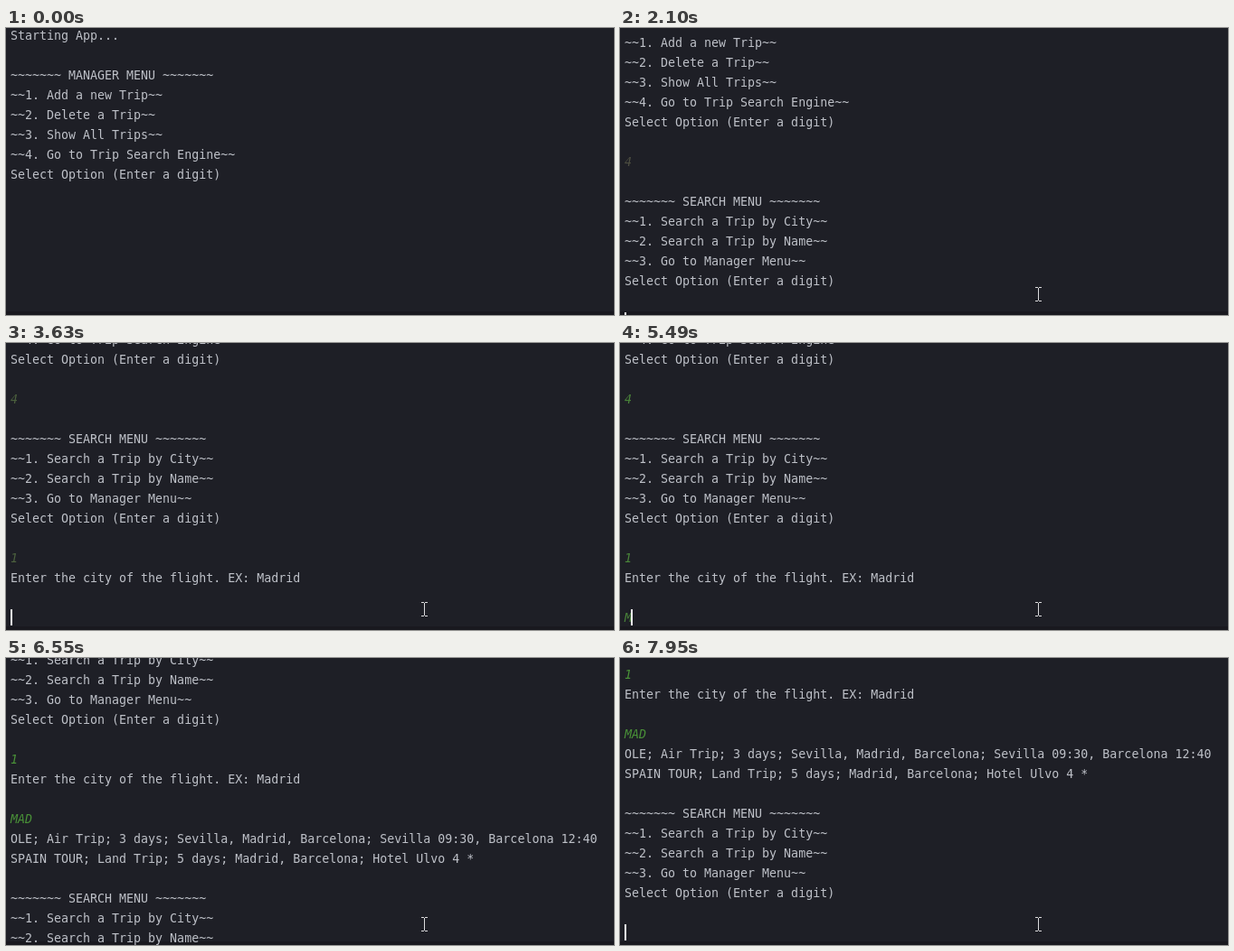
An HTML page with a canvas that plays this animation: 672x318 px, repeating every 8 s.

```html
<!DOCTYPE html>
<html lang="en">
<head>
<meta charset="utf-8">
<title>Trip manager console</title>
<style>
  html, body { margin: 0; width: 100%; height: 100%; overflow: hidden; background: #1e1f26; }
  canvas { display: block; }
</style>
</head>
<body>
<canvas id="stage" width="672" height="318"></canvas>
<script>
const ctx = document.getElementById('stage').getContext('2d', { alpha: false });
const LOOP = 8000, LINE = 22, CHAR = 8, LEFT = 5;
const LAST_ROW_TOP = 296;
const IDLE = 800, BLINK = 525, SETTLE = 70;
const FONT = '13.3px "DejaVu Sans Mono", monospace';

const menu = (name, ...items) => [
  '',
  `~~~~~~~ ${name} MENU ~~~~~~~`,
  ...items.map((item, i) => `~~${i + 1}. ${item}~~`),
  'Select Option (Enter a digit)',
  ''
];
const managerMenu = menu('MANAGER', 'Add a new Trip', 'Delete a Trip', 'Show All Trips', 'Go to Trip Search Engine');
const searchMenu = menu('SEARCH', 'Search a Trip by City', 'Search a Trip by Name', 'Go to Manager Menu');

// Console actions. A print may lag: it stays short of its full scroll for a moment.
const type = s => c => { c.input += s; };
const erase = c => { c.input = c.input.slice(0, -1); };
const enter = c => { c.lines.push({ text: c.input, typed: true }); c.input = ''; };
const print = (texts, lag = 0) => c => {
  c.lines.push(...texts.map(text => ({ text })));
  c.lag = lag;
};

const script = [
  [-1040, print(['Starting App...', ...managerMenu])],
  [1570, type('4')],
  [1900, enter],
  [2100, print(searchMenu, 20)],
  [2900, type('1')],
  [3430, enter],
  [3630, print(['Enter the city of the flight. EX: Madrid', ''])],
  [4830, type('M')],
  [4890, type('A')],
  [5490, erase],
  [5620, type('A')],
  [5750, type('D')],
  [6020, enter],
  [6550, print([
    'OLE; Air Trip; 3 days; Sevilla, Madrid, Barcelona; Sevilla 09:30, Barcelona 12:40',
    'SPAIN TOUR; Land Trip; 5 days; Madrid, Barcelona; Hotel Ulvo 4 *',
    ...searchMenu
  ], 94)]
];

function consoleAt(t) {
  const c = { lines: [], input: '', lag: 0 };
  let last = 0;
  for (const [time, act] of script) {
    if (time > t) break;
    c.lag = 0;
    act(c);
    last = time + (c.lag ? SETTLE : 0);
  }
  const idle = t - last;
  c.row = c.lines.length;
  c.scroll = Math.max(0, c.row * LINE - LAST_ROW_TOP) - (idle < 0 ? c.lag : 0);
  c.caret = idle < IDLE || Math.floor((idle - IDLE) / BLINK) % 2 === 1;
  return c;
}

// Typed text turns from a dull brown to green over the session.
function inputColor(t) {
  const k = Math.min(1, t / 6000) ** 2;
  const mix = (a, b) => Math.round(a + (b - a) * k);
  return `rgb(${mix(77, 74)}, ${mix(69, 146)}, ${mix(66, 56)})`;
}

const mousePath = [[200, 300, 212], [700, 416, 293], [959, 370, 268], [1097, 462, 295]];

function mouseAt(t) {
  const s = 200 + Math.floor((t - 200) / 69) * 69;
  const i = mousePath.findIndex(([time]) => time > s);
  if (i < 0) return mousePath[mousePath.length - 1].slice(1);
  const [t0, x0, y0] = mousePath[i - 1], [t1, x1, y1] = mousePath[i];
  const k = (s - t0) / (t1 - t0);
  return [Math.round(x0 + (x1 - x0) * k), Math.round(y0 + (y1 - y0) * k)];
}

function rect(color, x, y, w, h) {
  ctx.fillStyle = color;
  ctx.fillRect(x, y, w, h);
}

function drawMouse([x, y]) {
  const color = '#dcdcde';
  rect(color, x, y - 7, 1, 14);
  for (const edge of [y - 8, y + 7]) {
    rect(color, x - 3, edge, 3, 1);
    rect(color, x + 1, edge, 3, 1);
  }
}

function draw(t) {
  const c = consoleAt(t);

  rect('#1e1f26', 0, 0, 672, 318);
  rect('#19191f', 0, 314, 672, 4);

  [...c.lines, { text: c.input, typed: true }].forEach(({ text, typed }, row) => {
    ctx.font = typed ? 'italic ' + FONT : FONT;
    ctx.fillStyle = typed ? inputColor(t) : '#bec1c8';
    ctx.fillText(text, LEFT, 13 + row * LINE - c.scroll);
  });

  if (c.caret) {
    const col = c.input.length;
    rect('#f4f4f6', LEFT + col * CHAR - (col ? 1 : 0), c.row * LINE - c.scroll - 1, 2, 18);
  }
  if (t >= 200) drawMouse(mouseAt(t));
}

const start = performance.now();
function tick() {
  draw((performance.now() - start) % LOOP);
  requestAnimationFrame(tick);
}
tick();
</script>
</body>
</html>
```
